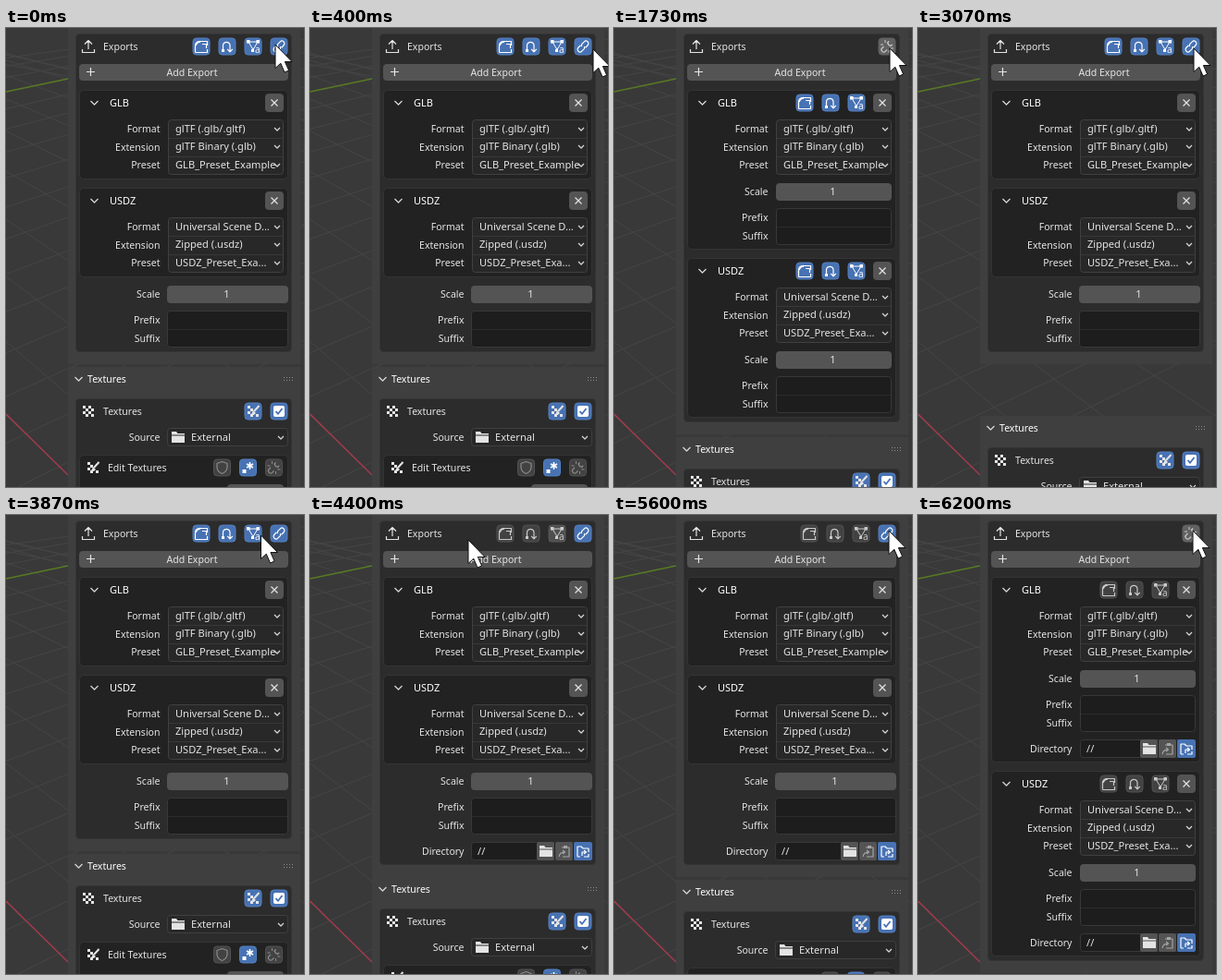
These frames come from a looping animation (322 px wide and 497 px high, 8 s). An HTML page with a canvas:

```html
<!DOCTYPE html>
<html lang="en">
<head>
<meta charset="utf-8">
<title>Export panel</title>
<style>
html, body { margin: 0; width: 322px; height: 497px; overflow: hidden; background: #393939; }
canvas { display: block; }
</style>
</head>
<body>
<canvas id="stage" width="322" height="497"></canvas>
<script>
const c = document.getElementById('stage').getContext('2d');
const FPS = 15, FRAMES = 120;
const BLUE = '#4772b3', GREY = '#545454', INK = '#e4e4e4', PANEL = '#3f3f3f', FIELD = '#1d1d1d';

// Keys are [frame, ...values]
const cursorKeys = [[0, 291, 18], [6, 306, 23], [12, 306, 23], [17, 298, 22], [55, 298, 22],
  [59, 268, 22], [62, 212, 20], [66, 171, 27], [67, 169, 27], [76, 169, 27], [84, 297, 17]];
const texturesKeys = [[23, 380], [24, 403], [25, 437], [26, 456], [45, 456], [46, 433], [47, 399], [48, 380],
  [63, 380], [64, 386], [65, 396], [66, 405], [67, 408], [91, 408], [92, 442], [93, 511]];

function at(keys, f) {
  const i = keys.findIndex(k => k[0] >= f);
  if (i < 0) return keys[keys.length - 1].slice(1);
  if (i === 0) return keys[0].slice(1);
  const a = keys[i - 1], b = keys[i], p = (f - a[0]) / (b[0] - a[0]);
  return a.slice(1).map((v, n) => v + (b[n + 1] - v) * p);
}

function box(x, y, w, h, fill, border, r = 3) {
  c.beginPath();
  c.roundRect(x + .5, y + .5, w - 1, h - 1, r);
  c.fillStyle = fill;
  c.fill();
  c.lineWidth = 1;
  c.strokeStyle = border || fill;
  c.stroke();
}

function text(s, x, y, align = 'left', size = 10.55, color = INK) {
  c.font = size + 'px "Noto Sans", "Open Sans", sans-serif';
  c.textAlign = align;
  c.fillStyle = color;
  c.fillText(s, x, y + 4);
}
const label = (s, y) => text(s, 166.5, y, 'right');
const value = (s, x, y) => text(s, x, y, 'left', 11.1);

function line(x, y, path, color = INK, width = 1.2) {
  c.save();
  c.translate(x, y);
  c.strokeStyle = color;
  c.lineWidth = width;
  c.lineJoin = 'round';
  c.stroke(new Path2D(path));
  c.restore();
}
function solid(x, y, path, color = INK) {
  c.save();
  c.translate(x, y);
  c.fillStyle = color;
  c.fill(new Path2D(path));
  c.restore();
}
const chevron = (x, y, s = 3) => line(x, y, `M${-s} ${-s / 2}L0 ${s / 2}L${s} ${-s / 2}`, '#d8d8d8');

function checker(x, y, keep = () => true) {
  c.fillStyle = INK;
  for (let i = 0; i < 16; i++) {
    const u = i % 4, v = i >> 2;
    if ((u + v) % 2 === 0 && keep(u, v)) c.fillRect(x - 6 + u * 3, y - 6 + v * 3, 3, 3);
  }
}

const icons = {
  bevel(x, y, k) {
    line(x, y, 'M-6.5 6.5V-.5Q-6.5 -5.5 -1 -5.5H6.5V-1M-6.5 6.5H6.5V3', k, 1.2);
    line(x, y, 'M-6 -1Q-5.5 -5 -1 -5.2', k, 2);
    line(x, y, 'M1 -2.5H5.5V2', k, 1.2);
  },
  arc(x, y, k) {
    line(x, y, 'M-4.5 4V-1.5A3.8 3.8 0 0 1 3 -1.5V5.5M.2 2.8L3 5.8L5.8 2.8', k, 1.2);
    solid(x, y, 'M-6 3h3v3h-3z', k);
  },
  mesh(x, y, k) {
    line(x, y, 'M-5 -5H5L0 3.5Z', k, 1);
    solid(x, y, 'M-7 -7h3.5v3.5h-3.5zM3.5 -7h3.5v3.5h-3.5zM-2 3h3v3h-3z', k);
    text('a', x + 2, y + 3, 'left', 10, k);
  },
  link(x, y, k) {
    c.save();
    c.translate(x, y);
    c.rotate(-Math.PI / 4);
    line(0, 0, 'M-1 -2.7H-4.5A2.7 2.7 0 0 0 -4.5 2.7H-1A2.7 2.7 0 0 0 1 1M1 2.7H4.5A2.7 2.7 0 0 0 4.5 -2.7H1A2.7 2.7 0 0 0 -1 -1', k);
    c.restore();
  },
  broken(x, y, k) {
    c.save();
    c.translate(x, y);
    c.rotate(-Math.PI / 4);
    line(0, 0, 'M-2.5 -2.5H-5A2.5 2.5 0 0 0 -5 2.5H-2.5M2.5 -2.5H5A2.5 2.5 0 0 0 5 2.5H2.5', k);
    c.restore();
    line(x, y, 'M-2 -4V-7M-4 -2H-7M2 4V7M4 2H7', k, 1);
  },
  close(x, y, k) { line(x, y, 'M-3.5 -3.5L3.5 3.5M3.5 -3.5L-3.5 3.5', k); },
  check(x, y) {
    box(x - 6, y - 6, 12, 12, '#fff', null, 1);
    line(x, y, 'M-3.5 0L-1 2.8L3.5 -3', BLUE, 1.8);
  },
  brush(x, y) {
    checker(x, y, (u, v) => u < 2 || v > 2);
    line(x, y, 'M6.5 -6L1 0', INK, 2);
    solid(x, y, 'M0 -1l3 3q-2 3 -6 2q2 -1 3 -5z');
  },
  shield(x, y, k) { line(x, y, 'M0 -6.5L5.5 -4.5V0Q5 4.5 0 6.5Q-5 4.5 -5.5 0V-4.5Z', k); },
  star(x, y) {
    line(x, y, 'M2 -6V2M-1.5 -4L5.5 0M5.5 -4L-1.5 0', '#fff', 1.6);
    solid(x, y, 'M-6 2h4v4h-4z', '#fff');
  },
  folder(x, y) { solid(x, y, 'M-7 -6H-2L-.5 -4H7V-2.5H-7ZM-7 -1.5H7V6H-7Z'); },
  paste(x, y) {
    line(x, y, 'M-3 -4H5V6H-2M-6 6Q-5 1 0 1M-2 -1L0.5 1L-2 3', '#a5a5a5', 1.2);
    solid(x, y, 'M-1 -6h4v3h-4z', '#a5a5a5');
  },
  relative(x, y) {
    line(x, y, 'M-6 6V-5H-2L0 -3H6V1M-6 6H-3', '#fff');
    line(x, y, 'M-1 5V1H3M1 -1L3.5 1L1 3M1 6H6V3', '#fff');
  }
};

function button(icon, x, y, on, { hot = false, ink = '#c9c9c9' } = {}) {
  const fill = on ? BLUE : hot ? '#626262' : '#424242';
  box(x - 9.5, y - 9.5, 19, 19, fill, on ? '#5680bf' : hot ? '#626262' : '#525252', 3.5);
  icons[icon](x, y, on ? '#fff' : ink);
}
function toggles(x, y, on, hot) {
  ['bevel', 'arc', 'mesh'].forEach((n, i) => {
    button(n, x + i * 28, y, on[i]);
    if (hot && i === 2) { c.fillStyle = '#ffffff12'; c.fillRect(x + 47, y - 9, 18, 18); }
  });
}

function viewport() {
  c.fillStyle = '#393939';
  c.fillRect(0, 0, 322, 497);
  for (let i = -3; i < 13; i++) {
    const y = 69 + 17 * i + 1.6 * i * i, s = .21 + .024 * i;
    line(0, 0, `M0 ${y}L322 ${y - 322 * s}`, '#454545', 1);
  }
  for (let i = -1; i < 12; i++) {
    const y = 419 - 84 * i + 4.5 * i * i, s = .97 - .115 * i + .004 * i * i;
    line(0, 0, `M0 ${y}L322 ${y + 322 * s}`, '#454545', 1);
  }
  line(0, 0, 'M0 69L67 55', '#587a22', 1.3);
  line(0, 0, 'M0 418L67 484', '#a83a4c', 1.3);
}

function panel(y, h) {
  c.fillStyle = PANEL;
  c.fillRect(67, y, 251, h);
}

// Scale, prefix, suffix and, if wanted, directory
function options(x, right, y, dir) {
  const w = right - x;
  label('Scale', y);
  box(x, y - 9, w, 19, GREY);
  text('1', x + w / 2 - 1, y, 'center', 11.1);
  label('Prefix', y + 28);
  label('Suffix', y + 48);
  box(x, y + 18, w, 40, FIELD, '#383838');
  c.fillStyle = '#2c2c2c';
  c.fillRect(x + 1, y + 38, w - 2, 1);
  if (!dir) return;
  y += 76;
  label('Directory', y);
  box(x, y - 10, w, 20, FIELD, '#383838');
  value('//', x + 7, y);
  ['folder', 'paste', 'relative'].forEach((n, i) => {
    const bx = right - 60 + i * 20;
    box(bx, y - 10, i < 2 ? 19 : 20, 20, i < 2 ? GREY : BLUE, null, 1.5);
    icons[n](bx + 10, y);
  });
}

function preset(y, title, values, s) {
  const h = s.linked ? 97 : s.dir ? 201 : 173;
  box(79, y, 226, h, '#222', '#343434', 4);
  chevron(95.5, y + 14, 4);
  text(title, 112, y + 14, 'left', 11, '#fff');
  if (!s.linked) toggles(206, y + 14, s.on);
  box(280, y + 4, 20, 20, GREY);
  icons.close(290, y + 14, INK);
  box(175, y + 32, 125, 60, '#282828', '#404040');
  ['Format', 'Extension', 'Preset'].forEach((n, i) => {
    const cy = y + 42 + Math.floor(i * 19.5);
    label(n, i === 1 ? cy + 1 : cy);
    value(values[i], 183, cy);
    chevron(293, cy + .5);
    if (i) { c.fillStyle = '#383838'; c.fillRect(176, y + 32 + i * 20, 123, 1); }
  });
  if (!s.linked) options(175, 300, y + 110, s.dir);
}

function exportsPanel(s) {
  const extra = s.dir ? 28 : 0;
  const end = s.linked ? 351 + extra : 427 + 2 * extra;
  panel(0, end + 13);
  box(75, 6, 234, end - 6, '#2c2c2c', '#353535', 4);
  line(89, 20, 'M-6.5 3V6.5H6.5V3M0 3V-6.5M-4 -2.5L0 -6.5L4 -2.5');
  text('Exports', 105, 20);
  if (s.linked) toggles(211, 20, s.on, s.hot);
  button(s.linked ? 'link' : 'broken', 295, 20, s.linked, { hot: true });
  box(79, 39, 226, 18, GREY);
  line(91.5, 47.5, 'M-4.5 0H4.5M0 -4.5V4.5');
  text('Add Export', 201, 48, 'center');
  preset(67, 'GLB', ['glTF (.glb/.gltf)', 'glTF Binary (.glb)', 'GLB_Preset_Example'], s);
  preset(s.linked ? 173 : 249 + extra, 'USDZ', ['Universal Scene D...', 'Zipped (.usdz)', 'USDZ_Preset_Exa...'], s);
  if (s.linked) options(174, 305, 288, s.dir);
}

function texturesPanel(top) {
  const y = Math.round(top);
  panel(y - 13, 200);
  chevron(78.5, y, 4);
  text('Textures', 88, y, 'left', 10.55, '#fff');
  c.fillStyle = '#8a8a8a';
  for (let i = 0; i < 8; i++) c.fillRect(300 + i % 4 * 3, y - 2 + (i >> 2) * 3, 1, 1);
  box(75, y + 21, 234, 180, '#2c2c2c', '#353535', 4);
  const row = y + 35, source = y + 63, edit = y + 96;
  const dim = { ink: '#8a8a8a' };
  checker(89, row);
  text('Textures', 105, row);
  button('brush', 267, row, true);
  button('check', 295, row, true);
  label('Source', source);
  box(174, source - 10, 131, 20, '#282828', '#404040');
  icons.folder(186, source);
  value('External', 200, source);
  chevron(297, source + .5);
  box(79, edit - 14, 226, 120, '#222', '#343434', 4);
  icons.brush(94, edit);
  text('Edit Textures', 110, edit);
  button('shield', 233.5, edit, false, dim);
  button('star', 261.5, edit, true);
  button('broken', 289.5, edit, false, dim);
  box(239, edit + 18, 61, 20, GREY);
}

function cursor(x, y) {
  const arrow = 'M0 0V25.5L5.8 20.2L10 30L14.6 28L10.4 18.5H18Z';
  solid(x, y, arrow, '#fff');
  line(x, y, arrow, '#111', 1);
}

function draw(now) {
  const f = Math.floor(now * FPS / 1000 + .06) % FRAMES;
  const state = {
    linked: f < 24 || f >= 46 && f < 92,
    on: [f < 62, f < 61, f < 60],
    hot: f >= 60 && f < 70,
    dir: f >= 64
  };
  viewport();
  exportsPanel(state);
  texturesPanel(at(texturesKeys, f)[0]);
  cursor(...at(cursorKeys, f));
}

const start = performance.now();
function tick() {
  draw(performance.now() - start);
  requestAnimationFrame(tick);
}
tick();
</script>
</body>
</html>
```
